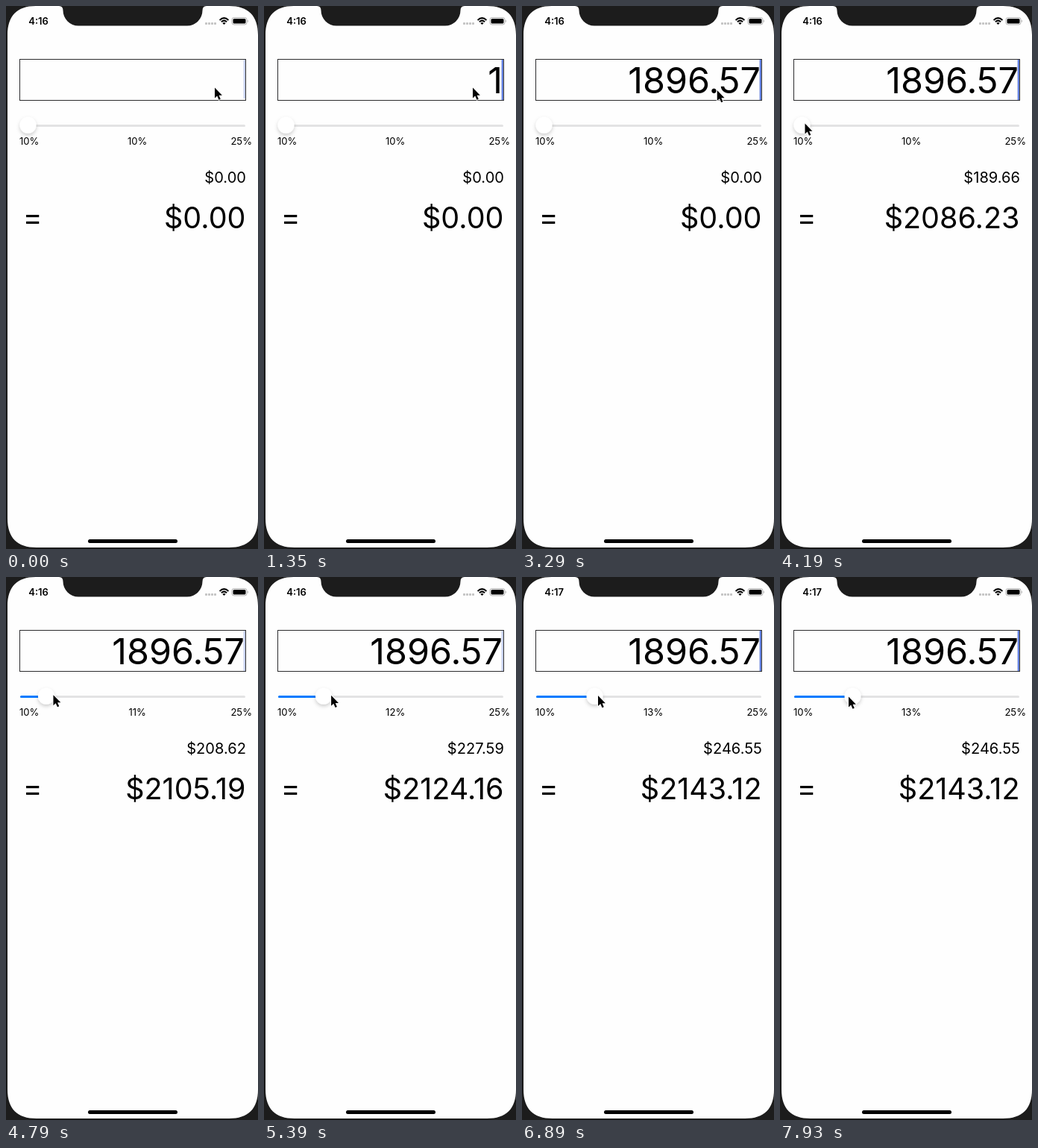
Animation of 338 by 728 pixels, one loop 8 s. Source, as an HTML page:

```html
<!DOCTYPE html>
<html lang="en">
<head>
<meta charset="utf-8">
<title>Tip calculator</title>
<style>
html, body { margin: 0; width: 100%; height: 100%; overflow: hidden; background: #1c1c1c; }
svg { display: block; width: 100vw; height: 100vh; }
text { font-family: Inter, Roboto, sans-serif; fill: #000; }
.end { text-anchor: end; }
.mid { text-anchor: middle; }
.label { font-size: 13.1px; }
.tip { font-size: 20.1px; }
.equals { font-size: 39px; }
.total { font-size: 39.5px; }
.amount { font-size: 48.5px; }
.clock { font-size: 13px; font-weight: 600; }
</style>
</head>
<body>
<svg viewBox="0 0 338 728" xmlns="http://www.w3.org/2000/svg">
  <defs>
    <filter id="shadow" x="-50%" y="-50%" width="200%" height="200%">
      <feDropShadow dx="0" dy="2.5" stdDeviation="2.4" flood-color="#000" flood-opacity=".2"/>
    </filter>
  </defs>
  <rect width="338" height="728" fill="#1c1c1c"/>
  <path fill="#fefefe" d="M40 0H71Q76.5 0 76.5 6A20.5 20.5 0 0 0 97 26.5H243A20.5 20.5 0 0 0 263.5 6Q263.5 0 269 0H299C325 0 338 13 338 39V687C338 713 325 726 299 726H41C15 726 2 713 2 687V39C2 13 15 0 40 0Z"/>
  <rect x="110" y="715" width="120" height="5" rx="2.5"/>

  <text id="clock" class="clock" x="30.3" y="25"></text>
  <g id="signal" fill="#c4c4c4"></g>
  <g fill="none" stroke="#000" stroke-width="2">
    <path d="M286.6 18.9Q292.5 13.4 298.4 18.9"/>
    <path d="M288.9 21.3Q292.5 18 296.1 21.3"/>
  </g>
  <path d="M290.4 22.9Q292.5 21.2 294.6 22.9L292.5 25Z"/>
  <rect x="303" y="15.5" width="20" height="9.5" rx="2.8" fill="none" stroke="#b4b4b4"/>
  <rect x="304.5" y="17" width="17" height="6.5" rx="1.5"/>
  <path fill="#b4b4b4" d="M324 18.5Q326 20.2 324 22Z"/>

  <rect x="18.5" y="71.5" width="303" height="55" fill="none" stroke="#2c2c2e"/>
  <text id="amount" class="amount end" x="320" y="117"></text>
  <rect id="caret" x="318.8" y="72" width="1.8" fill="#3d62d9"/>

  <rect x="19" y="159" width="302" height="3" rx="1.5" fill="#e3e3e4"/>
  <rect id="fill" x="19" y="159" height="3" rx="1.5" fill="#007aff"/>
  <circle id="thumb" cy="159.8" r="11" fill="#fff" filter="url(#shadow)"/>
  <text class="label" x="18" y="186">10%</text>
  <text id="percent" class="label mid" x="176.2" y="186"></text>
  <text class="label end" x="330" y="186">25%</text>

  <text id="tip" class="tip end" x="322" y="237"></text>
  <text class="equals" x="22.7" y="297">=</text>
  <text id="total" class="total end" x="321.5" y="297.5"></text>

  <path id="cursor" d="M0 0V14L3.2 11.1L5.5 16.2L7.8 15.2L5.6 10.2H9.9Z" stroke="#fff" stroke-width="2" stroke-linejoin="round" paint-order="stroke"/>
</svg>
<script>
const LOOP = 8000, BILL = 1896.57;
const SHOT = 149.4;
const TYPE_START = 1285, KEY_GAP = 255, TYPE_END = 2850;
const THUMB_START = 29.5, THUMB_END = 97.5;

const el = id => document.getElementById(id);
const set = (id, name, value) => el(id).setAttribute(name, value);
const write = (id, text) => { el(id).textContent = text; };
const clamp = (v, lo, hi) => Math.min(hi, Math.max(lo, v));
const progress = (t, from, to) => clamp((t - from) / (to - from), 0, 1);
const mix = (a, b, p) => a + (b - a) * p;
const smooth = p => p * p * (3 - 2 * p);
const easeOut = (p, power) => 1 - (1 - p) ** power;
const money = n => "$" + n.toFixed(2);

// Typing restarts the blink and keeps the caret lit.
function caretAlpha(t) {
  const phase = (t < TYPE_START ? t + 600 : Math.max(0, t - TYPE_END)) % 1000 / 1000;
  if (phase < .55) return 1;
  return phase < .63 || phase > .92 ? .35 : 0;
}

function pointerAt(t, drag) {
  const reach = smooth(progress(t, 3180, 3900));
  const pull = easeOut(drag, 2);
  const leave = smooth(progress(t, 7050, 7500));
  return [
    mix(280, 33.5, reach) + 68.5 * pull - 10 * leave,
    mix(109.5, 157.5, reach) + 1.5 * pull + 1.5 * leave
  ];
}

function draw(time) {
  const t = Math.floor(time / SHOT) * 150;
  const count = clamp(1 + Math.floor((t - TYPE_START) / KEY_GAP), 0, 7);
  const drag = progress(t, 4350, 6150);
  const thumb = mix(THUMB_START, THUMB_END, easeOut(drag, 1.55));
  const percent = Math.floor(10 + (thumb - THUMB_START) / 281 * 15);
  const tip = t < 4200 ? 0 : BILL * percent / 100;

  write("clock", t < 6750 ? "4:16" : "4:17");
  write("amount", BILL.toFixed(2).slice(0, count));
  set("caret", "opacity", caretAlpha(t));
  set("caret", "height", count ? 54 : 52);
  set("thumb", "cx", thumb);
  set("fill", "width", drag ? thumb - 19 : 0);
  write("percent", percent + "%");
  write("tip", money(tip));
  write("total", money(tip && BILL + tip));
  set("cursor", "transform", `translate(${pointerAt(t, drag)})`);
}

for (let i = 0; i < 4; i++) {
  el("signal").innerHTML += `<rect x="${267 + 4 * i}" y="22" width="3" height="3" rx=".8"/>`;
}

const start = performance.now();
function tick() {
  draw((performance.now() - start) % LOOP);
  requestAnimationFrame(tick);
}
draw(0);
tick();
</script>
</body>
</html>
```
